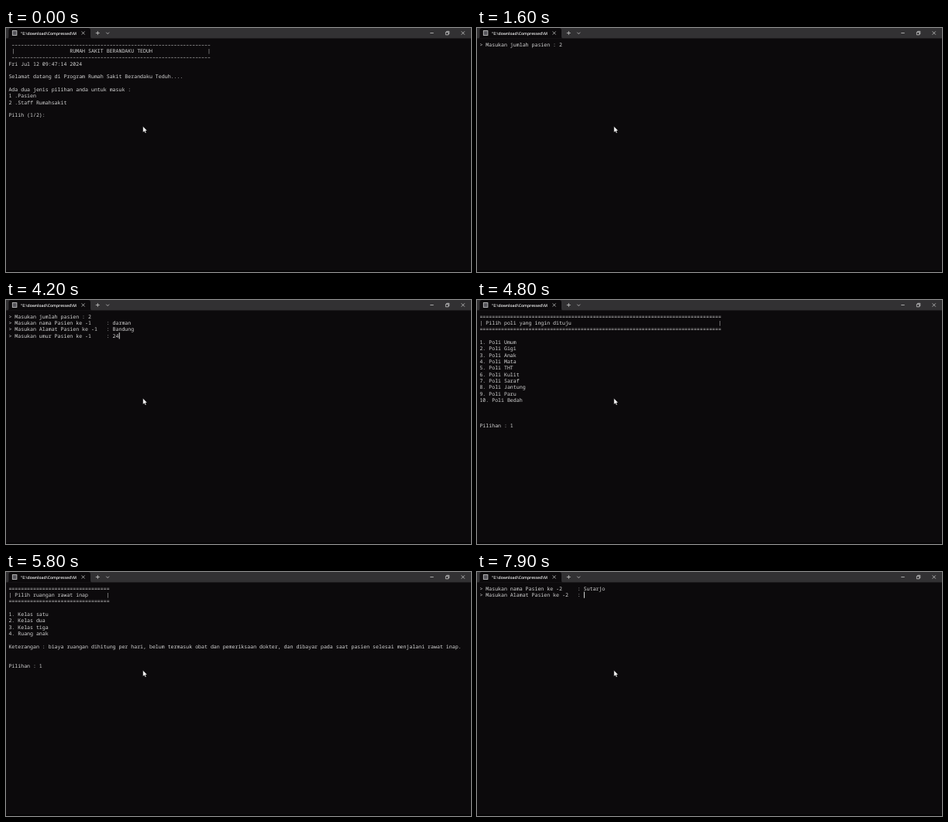
An HTML page that plays this animation: 600 px wide and 316 px high, repeating every 8000 ms.

```html
<!DOCTYPE html>
<html lang="id">
<head>
<meta charset="utf-8">
<title>Terminal</title>
<style>
  html, body { margin: 0; width: 100%; height: 100%; overflow: hidden; background: #0c0a0c; }
  svg { display: block; width: 100vw; height: 100vh; text-rendering: geometricPrecision; }
  #out { font: 6.59px "Noto Sans Mono", "DejaVu Sans Mono", monospace; fill: #d6d6d6; white-space: pre; }
  #tab { font: 600 5.1px "Open Sans", "Noto Sans", sans-serif; fill: #f4f4f4; }
  .icons { fill: none; stroke: #dcdcdc; stroke-width: .7; }
</style>
</head>
<body>
<svg viewBox="0 0 600 316">
  <rect width="600" height="13.4" fill="#323133"/>
  <path d="M2 13.4Q3.5 13.4 3.5 11V3Q3.5 0 6.5 0H106Q109 0 109 3V11Q109 13.4 110.5 13.4Z" fill="#0c0a0c"/>
  <rect y="314" width="600" height="2" fill="#050405"/>
  <rect x="8.3" y="3.6" width="5.6" height="5.8" fill="#55545a" stroke="#d0d0d0" stroke-width=".8"/>
  <text id="tab" x="19" y="8.7">"E:\download\Compressed\M</text>
  <g class="icons">
    <path d="M97.6 4.5l4 4m0-4l-4 4"/>
    <path d="M115.8 6.5h5m-2.5-2.5v5"/>
    <path d="M129.3 5.7l1.9 1.9 1.9-1.9"/>
    <path d="M547.3 6.5h4.4"/>
    <path d="M567.4 5.4h3.4v3.4h-3.4zM568.6 5.2v-.9h3.2v3.4h-.9"/>
    <path d="M587.6 4.4l4.2 4.2m0-4.2l-4.2 4.2"/>
  </g>
  <text id="out"></text>
  <rect id="caret" width=".9" height="8.2" fill="#f2f2f2"/>
  <path d="M176.8 127.6v7.4l1.7-1.5 1.2 2.6 1.2-.5-1.2-2.6h2.3z" fill="#fff" stroke="#222" stroke-width=".3"/>
</svg>
<script>
const LOOP = 8000, BLINK = 140;
const LEFT = 3.4, TOP = 17.2, COL = 3.955, ROW = 8.33, BASE = 6.6;

const CLEAR = '\f';
const page = (...rows) => CLEAR + rows.join('\n');
const ask = (label, width = 32) => label.padEnd(width) + ': ';
const askPatient = (what, n) => ask(`> Masukan ${what} ke -${n}`);
const boxed = (title, width) => {
  const rule = '='.repeat(width);
  return [rule, `| ${title.padEnd(width - 4)} |`, rule, ''];
};
const numbered = items => items.map((item, i) => `${i + 1}. ${item}`);
const type = (start, gap, text) => [...text].map((char, i) => [start + i * gap, char]);

const line = ' ' + '–'.repeat(65);
const welcome = page(
  line,
  ' |' + ' '.repeat(18) + 'RUMAH SAKIT BERANDAKU TEDUH'.padEnd(45) + '|',
  line,
  'Fri Jul 12 09:47:14 2024', '',
  'Selamat datang di Program Rumah Sakit Berandaku Teduh....', '',
  'Ada dua jenis pilihan anda untuk masuk :',
  '1 .Pasien', '2 .Staff Rumahsakit', '',
  'Pilih (1/2): ');

const menu = page(
  ...boxed('Pilih menu yang ingin dilihat', 33),
  ...numbered(['Pendaftaran', 'Dokter', 'Ruangan', 'Penebusan obat dan pembayaran',
    'Informasi tentang kesehatan', 'Tentang Rumah sakit', 'Kembali ke menu Utama']),
  '', 'Pilihan : ');

const clinics = page(
  ...boxed('Pilih poli yang ingin dituju', 79),
  ...numbered(['Umum', 'Gigi', 'Anak', 'Mata', 'THT', 'Kulit', 'Saraf', 'Jantung', 'Paru', 'Bedah']
    .map(name => 'Poli ' + name)),
  '', '', '', 'Pilihan : ');

const rooms = page(
  ...boxed('Pilih ruangan rawat inap', 33),
  ...numbered(['Kelas satu', 'Kelas dua', 'Kelas tiga', 'Ruang anak']), '',
  'Keterangan : biaya ruangan dihitung per hari, belum termasuk obat dan pemeriksaan dokter, dan dibayar pada saat pasien selesai menjalani rawat inap.',
  '', '', 'Pilihan : ');

const review = page(
  ask('Nama') + 'darman', ask('Alamat') + 'Bandung', ask('Umur') + '24', '',
  ask('Apakah data sudah benar?(y/t)', 38));

// Terminal output over time: [ms, text]; each entry restarts the caret blink.
const stream = [
  [-220, welcome],
  [260, '1'],
  [410, menu],
  [985, '1'],
  [1060, page('> Masukan jumlah pasien : ')],
  [1440, '2'],
  [1640, '\n' + askPatient('nama Pasien', 1)],
  [1860, 'r'.replace('r', 'd')],
  [2040, 'a'], [2120, 'r'], [2180, 'm'], [2240, 'a'], [2290, 'n'],
  [2340, '\n' + askPatient('Alamat Pasien', 1)],
  ...type(3150, 88, 'Bandung'),
  [3760, '\n' + askPatient('umur Pasien', 1)],
  ...type(4110, 60, '24'),
  [4260, clinics],
  [4640, '1'],
  [4860, page(ask('Apakah akan Rawat inap?(y/t)', 38))],
  [5260, 'y'],
  [5360, rooms],
  [5580, '1'],
  [5860, review],
  [6150, 'y'],
  [6260, page(askPatient('nama Pasien', 2))],
  ...type(7250, 36, 'Sutarjo'),
  [7560, '\n' + askPatient('Alamat Pasien', 2)],
];

const out = document.getElementById('out');
const caret = document.getElementById('caret');
let shown;

function draw(t) {
  const past = stream.filter(([at]) => at <= t);
  const text = past.map(([, part]) => part).join('').split(CLEAR).pop();
  const rows = text.split('\n');
  if (text !== shown) {
    shown = text;
    out.innerHTML = rows.map((row, i) =>
      `<tspan x="${LEFT}" y="${TOP + BASE + i * ROW}">${row}</tspan>`).join('');
    caret.setAttribute('x', LEFT + rows.at(-1).length * COL);
    caret.setAttribute('y', TOP + (rows.length - 1) * ROW);
  }
  const idle = t - past.at(-1)[0];
  caret.style.opacity = Math.floor(idle / BLINK) % 2 ? 0 : 1;
}

function frame() {
  draw(performance.now() % LOOP);
  requestAnimationFrame(frame);
}
frame();
</script>
</body>
</html>
```
